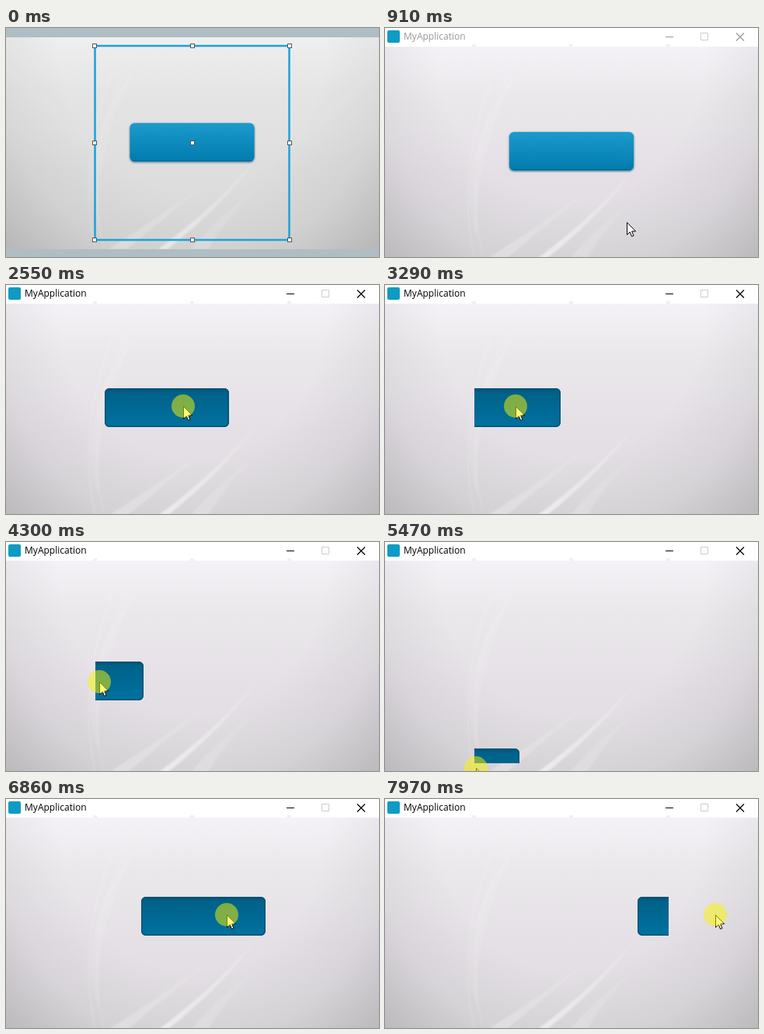
Recreate the animation shown at these times as an HTML page. Size 480 by 295 pixels, loop 8000 ms.

```html
<!DOCTYPE html>
<html lang="en">
<head>
<meta charset="utf-8">
<title>Dragging a button</title>
<style>
  html, body { margin: 0; width: 100%; height: 100%; overflow: hidden; background: #fff; }
  svg { display: block; }
  text { font: 12px "Open Sans", "Noto Sans", sans-serif; }
  .grey { filter: grayscale(1) brightness(.985); }
</style>
</head>
<body>
<svg width="480" height="295" viewBox="0 0 480 295">
  <defs>
    <linearGradient id="base" x2="0" y2="1">
      <stop stop-color="#f5f2f7"/>
      <stop offset=".25" stop-color="#ebe8ec"/>
      <stop offset=".6" stop-color="#e4e0e5"/>
      <stop offset="1" stop-color="#dfdce0"/>
    </linearGradient>
    <radialGradient id="shade" gradientUnits="userSpaceOnUse" cx="0" cy="0" r="1"
      gradientTransform="translate(240 10) scale(340 375)">
      <stop offset=".5" stop-color="#5a585c" stop-opacity="0"/>
      <stop offset=".75" stop-color="#5a585c" stop-opacity=".08"/>
      <stop offset="1" stop-color="#5a585c" stop-opacity=".27"/>
    </radialGradient>
    <linearGradient id="fade" x1="0" y1="1" x2="1" y2="0">
      <stop stop-color="#fff" stop-opacity=".7"/>
      <stop offset="1" stop-color="#fff" stop-opacity=".1"/>
    </linearGradient>
    <linearGradient id="up" x2="0" y2="1">
      <stop stop-color="#1c9bcc"/>
      <stop offset="1" stop-color="#007bad"/>
    </linearGradient>
    <linearGradient id="down" x2="0" y2="1">
      <stop stop-color="#004f70"/>
      <stop offset=".1" stop-color="#006189"/>
      <stop offset="1" stop-color="#00729f"/>
    </linearGradient>
    <filter id="soft"><feGaussianBlur stdDeviation=".8"/></filter>
    <clipPath id="box"><path d="M115 35h250v250H115z"/></clipPath>

    <g id="backdrop">
      <path fill="url(#base)" d="M0 0h480v273H0z"/>
      <path fill="url(#shade)" d="M0 0h480v273H0z"/>
      <g fill="url(#fade)" filter="url(#soft)">
        <path opacity=".8" d="M196 273Q270 218 326 152Q282 214 208 273Z"/>
        <path opacity=".4" d="M132 273Q200 230 270 178Q208 230 156 273Z"/>
        <path opacity=".3" d="M238 273Q272 232 326 192Q284 232 260 273Z"/>
      </g>
      <g fill="none" stroke="#fff" filter="url(#soft)">
        <path opacity=".28" d="M137 45Q90 160 115 273"/>
        <path opacity=".2" d="M156 38Q98 150 126 273"/>
      </g>
      <path fill="#fff" opacity=".1" filter="url(#soft)" d="M165 40Q84 150 120 250Q112 150 165 40Z"/>
    </g>

    <g id="raised">
      <rect x="-.5" y=".5" width="161" height="50.5" rx="6.5" fill="#00405e" opacity=".55" filter="url(#soft)"/>
      <rect width="160" height="49.5" rx="6" fill="url(#up)"/>
      <path d="M3 48.5h154" stroke="#00587f" opacity=".6"/>
    </g>
    <g id="pressed">
      <rect width="160" height="50" rx="6" fill="url(#down)"/>
      <rect x=".75" y=".75" width="158.5" height="48.5" rx="5.5" fill="none" stroke="#005073" stroke-width="1.5"/>
    </g>
  </defs>

  <g id="editor">
    <path fill="#aebec4" d="M0 0h480v295H0z"/>
    <use href="#backdrop" y="12" class="grey"/>
    <use href="#raised" x="159.5" y="122.5"/>
    <path fill="#aebec4" d="M0 285h480v10H0z"/>
    <path fill="none" stroke="#1ba1db" stroke-width="2.5" d="M114.5 23h250v250h-250z"/>
    <g id="handles" fill="#fff" stroke="#555"></g>
  </g>

  <g id="app">
    <path fill="#fff" d="M0 0h480v295H0z"/>
    <use href="#backdrop" y="24"/>
    <path fill="#f0eff1" d="M112 21h5v3h-5zM237 21h5v3h-5zM362 21h5v3h-5z"/>
    <rect x="3" y="3" width="16" height="16" rx="2" fill="#0e9bc4"/>
    <g id="bar">
      <text x="24" y="15.3" fill="currentColor">MyApplication</text>
      <path fill="none" stroke="currentColor" stroke-width="1.2" d="M361 11.5h10M452 6.5l10 10M462 6.5l-10 10"/>
    </g>
    <path fill="none" stroke="#ccc" d="M406.5 6.5h9v9h-9z"/>
    <g clip-path="url(#box)"><use id="button"/></g>
    <g id="pointer">
      <path fill="#fff" stroke="#000" stroke-linejoin="round"
        d="M.5 .5V16.3L4.2 12.8 6.6 18.5 9 17.4 6.6 11.9H11.6Z"/>
      <circle id="halo" r="15" fill="#faf600" opacity=".51"/>
    </g>
  </g>
</svg>
<script>
const $ = id => document.getElementById(id);
const LOOP = 8000, OPEN = 500, PRESS = 1660, LAG = 25;
const GRIP = { x: 104, y: 23 };

// Key points of the hand's path: time, x, y.
const path = [
  [700, 336, 300], [1430, 264, 157], [2000, 264, 157], [2830, 203, 156],
  [3290, 168, 156], [3750, 125, 156], [3900, 125, 156], [4730, 115, 224],
  [5470, 117, 291], [5640, 109, 300], [6440, 199, 158], [6860, 284, 149],
  [7270, 407, 149], [7690, 429, 149], [7940, 429, 149], [7970, 425, 149]
];
const last = path.length - 1;

const slope = (i, n) => (path[i + 1][n] - path[i][n]) / (path[i + 1][0] - path[i][0]);

// Speed at a key point: harmonic mean of both sides, zero at rests and turns.
function speed(i, n) {
  const a = slope(Math.max(i - 1, 0), n), b = slope(Math.min(i, last - 1), n);
  return a * b > 0 ? 2 * a * b / (a + b) : 0;
}

function hand(t) {
  t = Math.min(Math.max(t, path[0][0]), path[last][0]);
  const i = Math.max(path.findIndex(p => p[0] >= t) - 1, 0);
  const span = path[i + 1][0] - path[i][0], k = (t - path[i][0]) / span;
  const [x, y] = [1, 2].map(n => {
    const a = path[i][n], b = path[i + 1][n];
    return a + (b - a) * k * k * (3 - 2 * k)
      + span * k * (1 - k) * (speed(i, n) * (1 - k) - speed(i + 1, n) * k);
  });
  return { x, y };
}

const place = (id, x, y) =>
  $(id).setAttribute("transform", `translate(${Math.round(x)} ${Math.round(y)})`);
const show = (id, on) => $(id).setAttribute("display", on ? "inline" : "none");

for (const x of [114, 240, 365])
  for (const y of [23, 148, 273])
    $("handles").innerHTML += `<rect x="${x - 2.5}" y="${y - 2.5}" width="5" height="5"/>`;

function draw(now) {
  const t = now % LOOP, held = t >= PRESS;
  const tip = hand(t), grip = hand(Math.max(t - LAG, PRESS));
  show("editor", t < OPEN);
  show("app", t >= OPEN);
  show("halo", held);
  $("bar").setAttribute("color", held ? "#000" : "#999");
  $("button").setAttribute("href", held ? "#pressed" : "#raised");
  place("pointer", tip.x, tip.y);
  place("button", grip.x - GRIP.x, grip.y - GRIP.y);
}

const start = performance.now();
function tick() {
  draw(performance.now() - start);
  requestAnimationFrame(tick);
}
tick();
</script>
</body>
</html>
```
